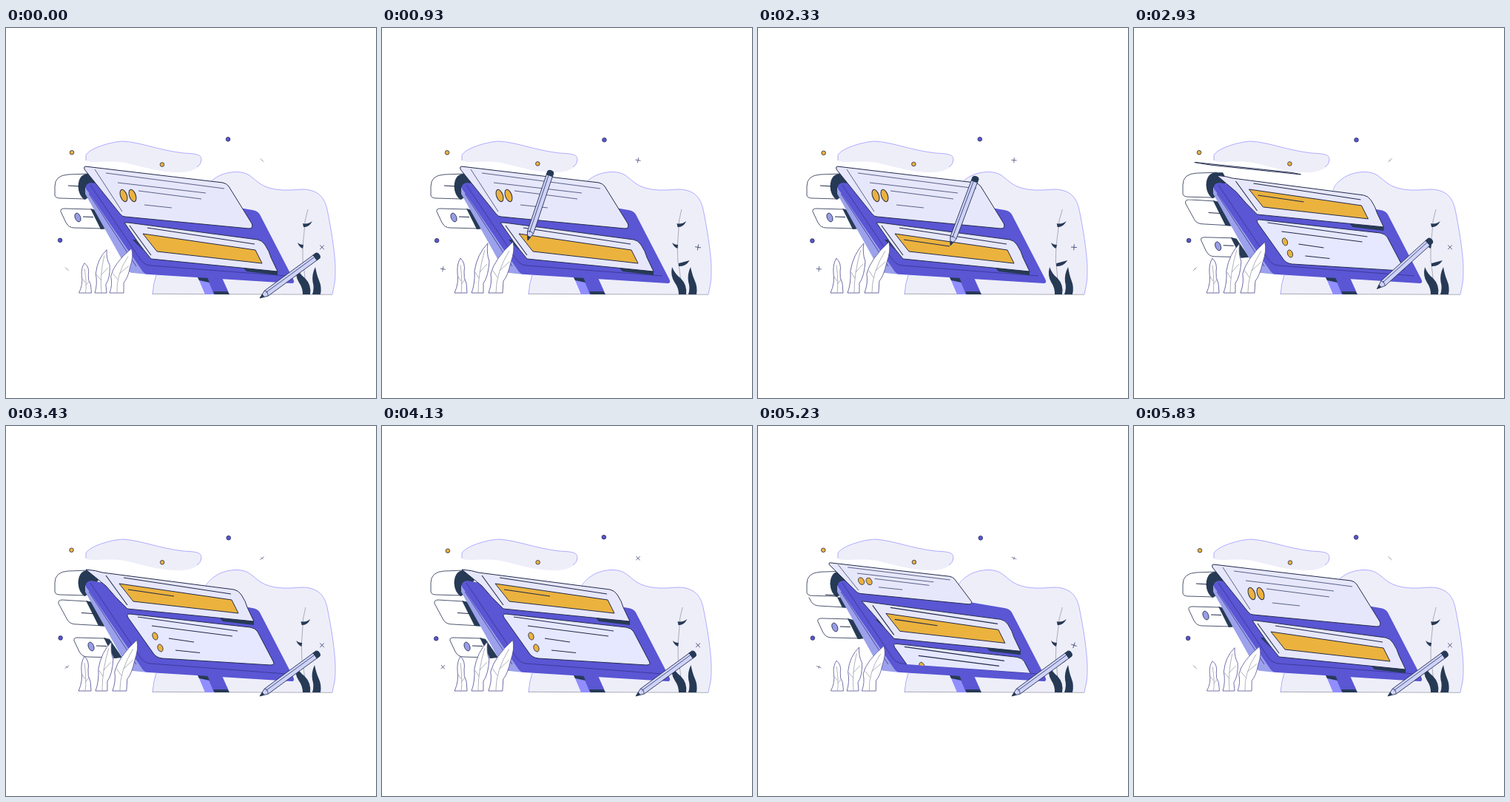
An HTML page for the animation above (5860 ms loop, 500x500 px).

```html
<!DOCTYPE html>
<html lang="en">
<head>
<meta charset="utf-8">
<title>Scrolling board</title>
<style>
html, body { margin: 0; width: 100%; height: 100%; overflow: hidden; background: #fff; }
svg { display: block; width: 100vw; height: 100vh; }
.navy { fill: #263a55; }
.gold { fill: #ebb23e; }
.paper { fill: #e7e7fb; }
.white { fill: #fff; }
.ink { stroke: #222c4c; stroke-width: 1; stroke-linejoin: round; }
.thin { stroke-width: .8; }
.line { fill: none; stroke: #35406a; stroke-width: .8; }
.bold { fill: none; stroke: #222c4c; stroke-width: 1.1; }
.seam { fill: none; stroke: #37348f; stroke-width: .8; }
.edge { fill: none; stroke: #908cff; stroke-width: .7; }
.vein { fill: none; stroke: #8d8f9c; stroke-width: .7; }
.sprig { fill: #fff; stroke: #4b4790; stroke-width: .8; }
#quote path { vector-effect: non-scaling-stroke; }
</style>
</head>
<body>
<svg viewBox="0 0 500 500">
  <defs>
    <clipPath id="aboveLip"><path d="M0 0H500V343L186 321L100 315Z"/></clipPath>
    <clipPath id="belowRoller"><path d="M40 231.500H220V340H40Z"/></clipPath>
  </defs>

  <!-- backdrop -->
  <path fill="#eeeef9" d="M198 360Q199 345 203 334L245 260C262 240 268 214 281 204C290 197 305 193 318 195C332 197 336 208 350 214C366 221 385 219 400 218C418 218 430 226 434 245C440 275 448 320 444 345L441 360Z"/>
  <path class="edge" d="M198 360Q199 345 203 334M269 219C272 211 276 208 281 204C290 197 305 193 318 195C332 197 336 208 350 214C366 221 385 219 400 218C418 218 430 226 434 245C440 275 448 320 444 345L441 360"/>
  <path fill="#eeeef9" d="M108 172C112 163 140 154 158 153C185 155 205 165 240 169C255 170 264 170 264 178C264 189 250 195 236 195C212 196 190 189 165 183C140 177 110 185 108 178Z"/>
  <path class="edge" d="M108 179V172C112 163 140 154 158 153C185 155 205 165 240 169C255 170 264 170 264 178Q264 184 258 188"/>
  <path class="vein" d="M198 359.300L441 360.300"/>
  <g id="dots"></g>
  <g id="crosses"></g>

  <!-- right plants -->
  <g id="rightPlants">
    <path class="vein" d="M405 355Q404 330 401 315Q400 295 403 275Q403 260 408 245"/>
    <path class="navy" d="M401 264Q407 266 414 261Q409 270 402 269ZM394 290Q397 293 402 293L401 298Q396 296 394 290ZM402 318L417 314Q411 323 402 322Z"/>
    <path class="navy" d="M401 360Q401 351 396 344Q390 335 393 323Q397 333 404 338Q413 347 411 360ZM414 360Q417 351 414.500 343Q413 333 418 323Q420 334 423 341Q427 350 425 360Z"/>
  </g>

  <!-- stand -->
  <path fill="#918eff" d="M258 334H272L287 360H269Z"/>
  <path fill="#5a56d4" d="M269 331H289L302 360H281Z"/>
  <path class="navy" d="M258 335L272 337L275 344L261 341ZM280 356L299 356L302 360H282Z"/>

  <!-- cards on the back -->
  <g id="backLow">
    <path class="ink thin white" d="M74 248Q73 244 79 244L116 245L132 271L92 270Q85 270 81 263Z"/>
    <path class="navy" d="M114 244L122 246L139 271L128 272Z"/>
    <ellipse class="ink thin" fill="#989de6" cx="97" cy="256" rx="3.6" ry="6.2" transform="rotate(-22 97 256)"/>
    <path class="bold" d="M104 255L118 255.500"/>
  </g>
  <g clip-path="url(#belowRoller)"><g id="backMid">
    <path class="ink thin white" d="M71 240Q70 235 76 235L110 237L132 270L96 268Q86 268 83 262Z"/>
    <path class="navy" d="M108 236L117 238L137 271L125 270Z"/>
  </g></g>
  <g id="roller">
    <path class="ink thin white" d="M112 197L84 198Q66 199 66 214V226Q67 230 73 230L108 231"/>
    <path class="navy" d="M120 197H109Q98 199 97.500 214Q98 226 106 232L114 228L126 208Z"/>
  </g>
  <path id="backLine" class="bold" d="M102 252.500L118 253.500"/>

  <!-- board -->
  <path fill="#9ca1ec" d="M107 215L107 224L164 326Q166 331 172 331L191 333L180 310Z"/>
  <path fill="#5a56d4" d="M115 209Q107 210 108 217L184 328Q187 333 193 333L386 345Q391 345 388 339L343 252Q340 247 333 246Z"/>
  <path class="seam" d="M114 212L181 312Q186 320 195 321L379 335M112 224L176 322"/>

  <!-- front cards -->
  <g id="quote">
    <path class="ink paper" d="M107 187L293 209Q298 210 301 214L332 264Q335 271 328 271L161 255Q157 255 154 251L106 191Q105 187 107 187Z"/>
    <g id="quoteText">
      <path class="line" d="M120 191L157 248M135 196L295 217M151 209L270 223M179 220L264 231M187 239L224 243"/>
      <ellipse class="ink gold" cx="159" cy="226.500" rx="4.3" ry="8.5" transform="rotate(-20 159 226.500)"/>
      <ellipse class="ink gold" cx="171" cy="226.500" rx="4.3" ry="8.5" transform="rotate(-20 171 226.500)"/>
    </g>
  </g>
  <g id="form">
    <path class="navy" d="M320 323L367 328L367 334L325 329ZM171 286L175 286L186 301Z"/>
    <path id="formPaper" class="ink paper"/>
    <path class="bold" d="M167 267L196 307M191 270L336 292"/>
    <path class="ink gold" d="M185 278L337 300L346 318L204 302Z"/>
    <path id="written" class="bold"/>
  </g>
  <g clip-path="url(#aboveLip)"><g id="list">
    <path class="ink" fill="#e6e8ff" d="M167 254L330 272Q337 273 340 278L361 318Q364 323 357 323L211 314Q203 313 199 307L165 259Q162 254 167 254Z"/>
    <path class="bold" d="M178 258L313 277M197 270L306 284M220 287L254 292M229 303L262 306.500"/>
    <ellipse class="ink thin gold" cx="201.500" cy="284" rx="3.4" ry="5.2" transform="rotate(-20 201.500 284)"/>
    <ellipse class="ink thin gold" cx="208.500" cy="300" rx="3.4" ry="5.2" transform="rotate(-20 208.500 300)"/>
  </g></g>

  <!-- left plants -->
  <g id="sprig0">
    <path class="sprig" d="M98 358Q104 345 102 331Q101 319 106 311Q113 318 111 329Q110 338 114 345L115 358Z"/>
    <path class="vein" d="M107 358Q109 345 106 320M107 342L103 336M107 346L112 340"/>
  </g>
  <g id="sprig1">
    <path class="sprig" d="M121 358Q126 345 125 328Q129 305 143 291Q141 305 145 315Q144 335 137 345V358Z"/>
    <path class="vein" d="M130 358Q130 330 139 300M131 338L126 330M132 330L142 319"/>
  </g>
  <g id="sprig2">
    <path class="sprig" d="M144 358Q149 345 147 332Q152 312 177 289Q180 300 174 317Q170 335 164 342L163 358Z"/>
    <path class="vein" d="M154 358Q154 330 172 301M156 337L150 328M159 328L172 316"/>
  </g>

  <!-- pencil, tip at its own origin -->
  <g id="pencil">
    <path class="ink thin" fill="#cfd3fa" d="M0 0L11 -4.300H93V4.300H11Z"/>
    <path class="line" d="M11 -1.200H92M11 -4.300L13 -1.200L11 4.300"/>
    <path class="navy" d="M0 0L6 -2.600V2.600ZM92 -4.800H97Q100 -4 100 0Q100 4 97 4.800H92Z"/>
  </g>
</svg>
<script>
const LOOP = 5860;
const $ = id => document.getElementById(id);
const ease = p => p < .5 ? 4 * p ** 3 : 1 - 4 * (1 - p) ** 3;
const mix = (a, b, p) => a + (b - a) * p;
const span = (t, from, to) => Math.min(1, Math.max(0, (t - from) / (to - from)));
const put = (id, transform) => $(id).setAttribute('transform', transform);
const shift = (id, x, y) => put(id, `translate(${x} ${y})`);
const show = (id, visible) => $(id).style.display = visible ? '' : 'none';

// keys: [time, value, value...], eased between neighbours
function track(keys, t) {
  let i = 1;
  while (i < keys.length - 1 && t > keys[i][0]) i++;
  const [a, b] = [keys[i - 1], keys[i]];
  const p = ease(span(t, a[0], b[0]));
  return a.slice(1).map((v, n) => mix(v, b[n + 1], p));
}

const pencilKeys = [
  [0, 343, 365, -36.2], [900, 197, 287, -71.5], [2310, 260, 294, -69.5],
  [3270, 343, 365, -36.2], [LOOP, 343, 365, -36.2]
];
const swayKeys = [[0, 0], [800, 1], [4130, .96], [4850, .1], [LOOP, 0]];
const spinKeys = [[0, 45], [930, 10], [2330, 4], [2930, 45], [4130, 48], [4800, 8], [5830, 45], [LOOP, 45]];
const flatKeys = [[0, .15], [930, 1], [2330, 1], [2930, .25], [4130, 1], [4800, .7], [5830, .15], [LOOP, .15]];
// matrices of the top card: lying flat, and turned edge-on over the roller
const level = [1, 0, 0, 1, 0, 0];
const edgeOn = [.678, .0774, -.224, -.0813, 50.7, 188.1];

const dots = [[88.5, 168.3, '#ebb23e'], [210.7, 184, '#ebb23e'], [300.3, 150.8, '#5a56d4'], [73.6, 287, '#5a56d4']];
const crosses = [[346, 178.7, true], [82.3, 325.7, true], [427, 296.3, false]];
$('dots').innerHTML = dots.map(d => `<circle class="ink thin" r="2.8" fill="${d[2]}"/>`).join('');
$('crosses').innerHTML = crosses.map(() => '<path class="line" d="M-4 0H4M0 -4V4"/>').join('');

function drawCards(t) {
  const u = ease(span(t, 2330, 3150)) - ease(span(t, 4785, 5605));
  put('quote', `matrix(${level.map((v, i) => mix(v, edgeOn[i], u)).join(' ')})`);
  show('quote', u < .95);
  show('quoteText', u < .8);

  shift('form', -32 * u, -65 * u);
  const x = 160 - 20 * u, y = 263 - 4 * u;
  $('formPaper').setAttribute('d',
    `M${x} ${y}Q${mix(163, 154, u)} ${mix(263, 260, u)} ${mix(165, 162, u)} 263` +
    `L340 286Q346 287 350 293Q356 302 358 310L367 329L196 312` +
    `Q${mix(186, 180, u)} ${mix(300, 297, u)} ${mix(178, 167, u)} ${mix(289, 281, u)}Z`);

  const drawn = t < 4785 ? ease(span(t, 900, 2310)) : 1 - ease(span(t, 5100, 5600));
  $('written').setAttribute('d', `M197 286L${mix(197, 259, drawn)} ${mix(286, 295, drawn)}`);
  show('written', drawn > .01);

  shift('list', 32 * (1 - u), 65 * (1 - u));
  show('list', u > .02);
  shift('backLow', 18 * u, 42 * u);
  shift('backMid', -18 * (1 - u), -40 * (1 - u));
  shift('backLine', -18 * (1 - u), -39.5 * (1 - u));
  shift('roller', 0, -2 * u);
}

function drawPlants(t) {
  const [s] = track(swayKeys, t);
  // rest pose: base shift, lean of the tip, height
  [[.5, -.5, .86], [-1, -6, .87], [-4, -3.5, .87]].forEach(([base, lean, height], i) => {
    const rest = 1 - s, sy = mix(height, 1, s), k = -lean * rest / 68;
    put('sprig' + i, `matrix(1 0 ${k} ${sy} ${base * rest - 358 * k} ${358 * (1 - sy)})`);
  });
  const lean = .03 * Math.sin(t / LOOP * Math.PI * 4);
  put('rightPlants', `matrix(1 0 ${lean} 1 ${-360 * lean} 0)`);
}

function drawSparks(t) {
  const turn = t / LOOP * Math.PI * 2;
  dots.forEach(([x, y], i) => {
    const dot = $('dots').children[i];
    dot.setAttribute('cx', x + .5 * Math.cos(3 * turn + i));
    dot.setAttribute('cy', y + .6 * Math.sin(3 * turn + i * 2));
  });
  const [spin] = track(spinKeys, t), [flat] = track(flatKeys, t);
  const axis = 45 + 180 * t / LOOP;
  crosses.forEach(([x, y, flips], i) => {
    const squash = flips ? `rotate(${axis}) scale(1 ${flat}) rotate(${-axis})` : '';
    $('crosses').children[i].setAttribute('transform',
      `translate(${x} ${y}) ${squash} rotate(${spin}) scale(${flips ? .9 : 1})`);
  });
}

function draw(t) {
  drawCards(t);
  drawPlants(t);
  drawSparks(t);
  const [x, y, angle] = track(pencilKeys, t);
  put('pencil', `translate(${x} ${y}) rotate(${angle})`);
}

const start = performance.now();
function frame() {
  draw((performance.now() - start) % LOOP);
  requestAnimationFrame(frame);
}
frame();
</script>
</body>
</html>
```
